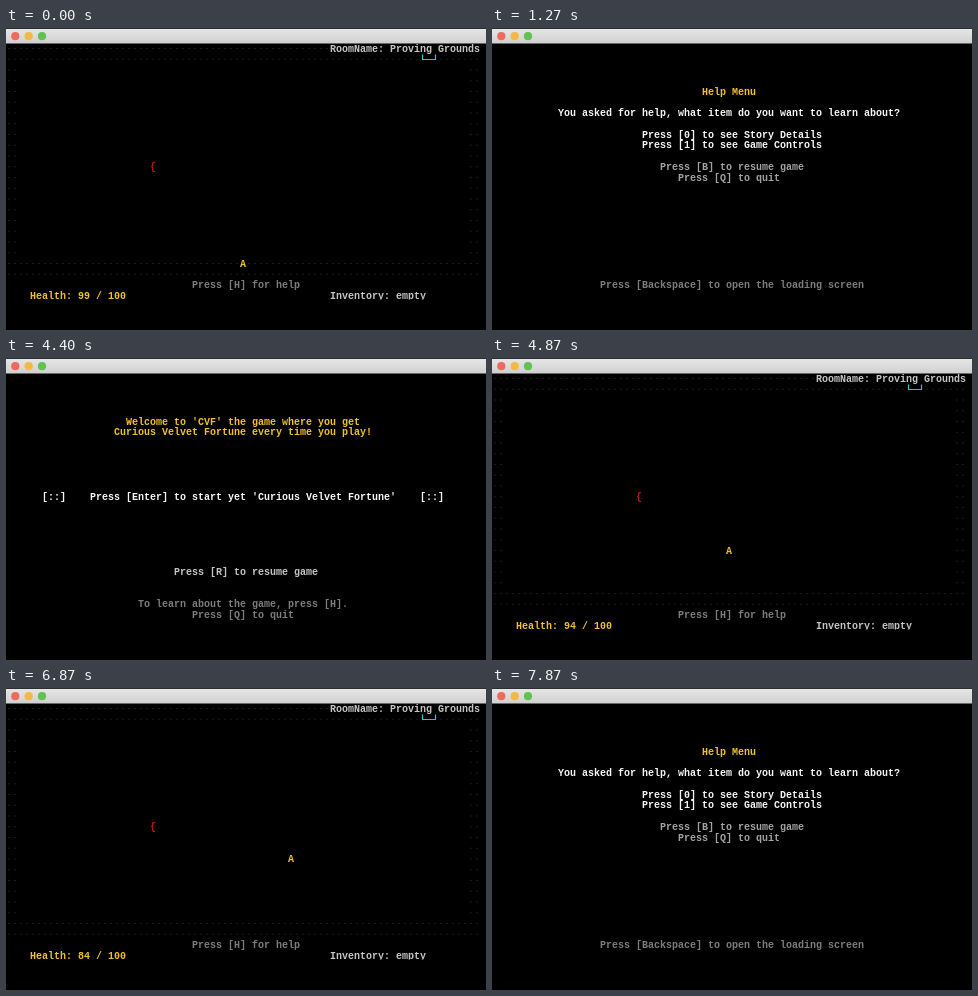
Write an HTML page that moves like this. It is 480 px wide and 302 px high and loops after 8 s.

```html
<!DOCTYPE html>
<html lang="en">
<head>
<meta charset="utf-8">
<title>Terminal game</title>
<style>
  html, body { margin: 0; width: 100%; height: 100%; overflow: hidden; background: #000; }
  svg { display: block; width: 100vw; height: 100vh; }
  text {
    font: bold 10px "Liberation Mono", monospace;
    white-space: pre;
  }
</style>
</head>
<body>
<svg id="stage" viewBox="0 0 480 302">
  <defs>
    <linearGradient id="bar" x2="0" y2="1">
      <stop offset="0" stop-color="#e6e6e6"/>
      <stop offset="1" stop-color="#d0d0d0"/>
    </linearGradient>
    <clipPath id="terminal"><rect y="15" width="480" height="256.5"/></clipPath>
  </defs>
  <rect width="480" height="302"/>
  <rect y=".8" width="480" height="14.7" fill="url(#bar)"/>
  <circle cx="9.3" cy="8.2" r="4.1" fill="#ee6a5e"/>
  <circle cx="22.7" cy="8.2" r="4.1" fill="#f3b945"/>
  <circle cx="36" cy="8.2" r="4.1" fill="#60c251"/>
  <g id="screens" clip-path="url(#terminal)"></g>
</svg>
<script>
const LOOP = 8000, CELL_W = 6, CELL_H = 10.75, TOP = 15.2;
const WHITE = '#f4f4f4', LIGHT = '#c4c4c4', GREY = '#a2a2a2', DIM = '#7c7c7c', GOLD = '#efc02c';

const colX = col => col * CELL_W;
const rowY = row => TOP + row * CELL_H;

function add(parent, tag, attrs) {
  const node = document.createElementNS('http://www.w3.org/2000/svg', tag);
  for (const key in attrs) node.setAttribute(key, attrs[key]);
  return parent.appendChild(node);
}

function place(node, col, row) {
  node.setAttribute('x', colX(col));
  node.setAttribute('y', rowY(row) + 8.3);
}

function print(parent, col, row, color, content) {
  const node = add(parent, 'text', { fill: color });
  node.textContent = content;
  place(node, col, row);
  return node;
}

const root = document.getElementById('screens');
const screens = {};
for (const name of ['game', 'help', 'loading']) screens[name] = add(root, 'g', {});
const { game, help, loading } = screens;

// Dotted walls, two cells thick
function dots(x1, y1, x2, y2, gap) {
  add(game, 'path', {
    d: `M${x1} ${y1}L${x2} ${y2}`, stroke: '#343434', 'stroke-dasharray': `1 ${gap - 1}`
  });
}
const dotRow = (row, from, to) =>
  dots(colX(from) + 2.5, rowY(row) + 5.3, colX(to + 1), rowY(row) + 5.3, CELL_W);
dotRow(0, 0, 53);
dotRow(1, 0, 68);
dotRow(1, 72, 78);
dotRow(20, 0, 78);
dotRow(21, 0, 78);
for (const col of [0, 1, 77, 78])
  dots(colX(col) + 3, rowY(2) + 4.8, colX(col) + 3, rowY(20), CELL_H);

add(game, 'path', { d: 'M416.5 26.5V31.5H429.5V26.5', fill: 'none', stroke: '#2cc5c5', 'stroke-width': 1.2 });
print(game, 54, 0, LIGHT, 'RoomName: Proving Grounds');
print(game, 24, 11, '#b21c14', '{');
print(game, 31, 22, DIM, 'Press [H] for help');
print(game, 54, 23, LIGHT, 'Inventory: empty');
const health = print(game, 4, 23, GOLD, '');
const player = print(game, 39, 20, GOLD, 'A');

print(help, 35, 4, GOLD, 'Help Menu');
print(help, 11, 6, WHITE, 'You asked for help, what item do you want to learn about?');
print(help, 25, 8, WHITE, 'Press [0] to see Story Details');
print(help, 25, 9, WHITE, 'Press [1] to see Game Controls');
print(help, 28, 11, GREY, 'Press [B] to resume game');
print(help, 31, 12, GREY, 'Press [Q] to quit');
print(help, 18, 22, DIM, 'Press [Backspace] to open the loading screen');

const TITLE = 'Curious Velvet Fortune';
print(loading, 20, 4, GOLD, "Welcome to 'CVF' the game where you get");
print(loading, 18, 5, GOLD, `${TITLE} every time you play!`);
print(loading, 6, 11, WHITE, '[::]');
print(loading, 14, 11, WHITE, `Press [Enter] to start yet '${TITLE}'`);
print(loading, 69, 11, WHITE, '[::]');
print(loading, 28, 18, LIGHT, 'Press [R] to resume game');
print(loading, 22, 21, DIM, 'To learn about the game, press [H].');
print(loading, 31, 22, DIM, 'Press [Q] to quit');

const cuts = [[0, 'game'], [1200, 'help'], [3270, 'loading'], [4870, 'game'], [7800, 'help']];

// Every turn costs one health point: U up, R right, W wait
const turns = [
  [70, 'U'], [200, 'U'], [470, 'U'], [670, 'U'], [870, 'W'],
  [5670, 'R'], [5870, 'R'], [6000, 'R'], [6130, 'R'],
  [6330, 'R'], [6400, 'R'], [6530, 'U'], [6600, 'R'], [6670, 'R'], [6870, 'U'],
  [7000, 'R'], [7130, 'U'], [7200, 'R'], [7330, 'U'], [7470, 'U']
];

function render(time) {
  const current = cuts.filter(([start]) => start <= time).pop()[1];
  for (const name in screens)
    screens[name].setAttribute('display', name === current ? 'inline' : 'none');

  const taken = turns.filter(([start]) => start <= time);
  const count = key => taken.filter(([, move]) => move === key).length;
  place(player, 39 + count('R'), 20 - count('U'));
  health.textContent = `Health: ${99 - taken.length} / 100`;
}

const begin = performance.now();
function tick() {
  render((performance.now() - begin) % LOOP);
  requestAnimationFrame(tick);
}
tick();
</script>
</body>
</html>
```
